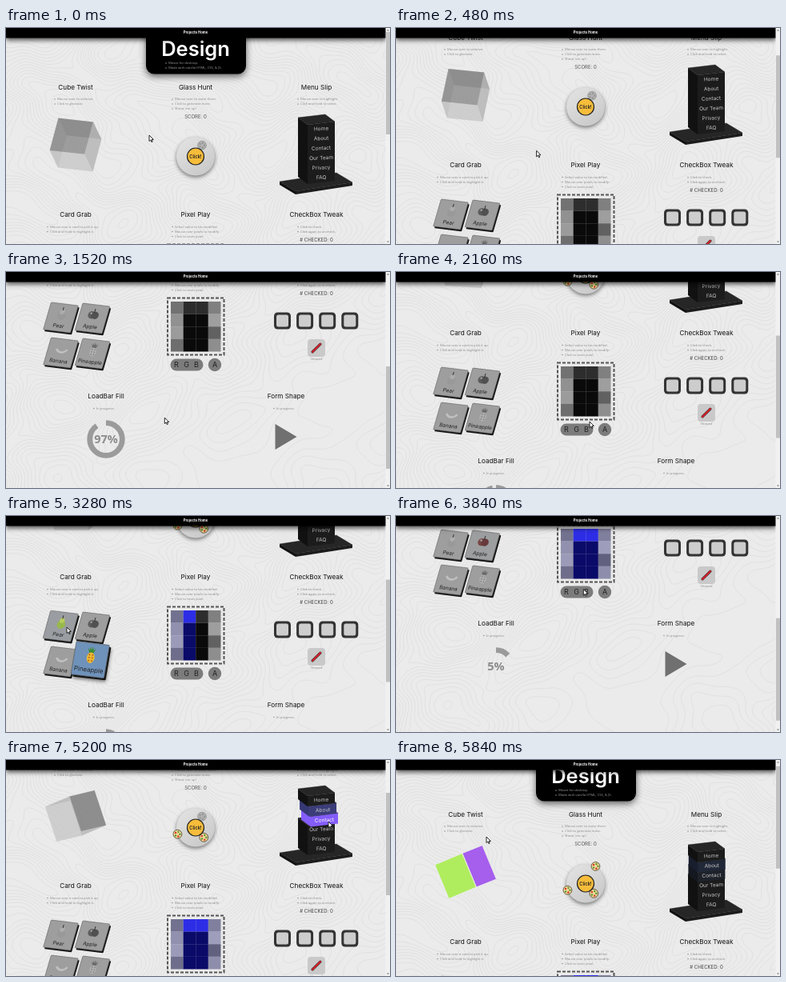
Recreate the animation shown at these times as an HTML page with a canvas. Size 480 px wide and 270 px high, loop 5.92 s.

```html
<!DOCTYPE html>
<html lang="en">
<head>
<meta charset="utf-8">
<title>Design projects</title>
<style>
  html, body { margin: 0; width: 100%; height: 100%; overflow: hidden; background: #ebebeb; }
  canvas { display: block; width: 480px; height: 270px; }
</style>
</head>
<body>
<canvas id="stage" width="480" height="270"></canvas>
<script>
const LOOP = 5920, STEP = 80, PAGE_W = 475, PAGE_H = 544, MAX_SCROLL = 274;
const ctx = document.getElementById('stage').getContext('2d');

const clamp = v => Math.max(0, Math.min(1, v));
const smooth = p => p * p * (3 - 2 * p);
const ramp = (t, from, to) => smooth(clamp((t - from) / (to - from)));
const mix = (a, b, k) => `rgb(${a.map((v, i) => Math.round(v + (b[i] - v) * k))})`;
const gray = v => [v, v, v];
const noise = n => { const v = Math.sin(n * 12.9898 + 4) * 43758.5453; return v - Math.floor(v); };

// Each scroll move: start, end, distance.
const MOVES = [[240, 1020, 274], [1300, 1900, -117], [3320, 3960, 112], [4320, 4800, -193], [5300, 5950, -76]];
const scrollAt = t => MOVES.reduce((y, [from, to, by]) => y + by * ramp(t, from, to), 0);

// Cursor stops: time, x, y.
const STOPS = [[0, 179, 134], [1120, 171, 179], [2160, 242, 187], [2500, 228, 130], [3120, 106, 180],
  [3280, 76, 139], [4320, 370, 51], [5200, 403, 77], [5400, 396, 46], [5700, 113, 96], [LOOP, 113, 96]];

function cursorAt(t) {
  const i = STOPS.findIndex(s => s[0] > t);
  const [from, ax, ay] = STOPS[i - 1], [to, bx, by] = STOPS[i];
  const p = (t - from) / (to - from);
  return [ax + (bx - ax) * p, ay + (by - ay) * p];
}

// Hover strength of a page area: rises fast under the cursor, then fades.
function hover(t, x, y, halfW, halfH) {
  let amount = 0;
  for (let s = Math.max(0, t - 1600); s <= t; s += 40) {
    const [cx, cy] = cursorAt(s);
    const over = Math.abs(cx - x) < halfW && Math.abs(cy + scrollAt(s) - y) < halfH;
    amount = clamp(amount + (over ? .25 : -.06));
  }
  return amount;
}

function text(s, x, y, size, color, { align = 'center', weight = 400, family = 'Inter' } = {}) {
  ctx.font = `${weight} ${size}px "${family}", sans-serif`;
  ctx.textAlign = align;
  ctx.textBaseline = 'middle';
  ctx.fillStyle = color;
  ctx.fillText(s, x, y + .5);
}

function circle(x, y, r, fill, stroke, width = 1) {
  ctx.beginPath();
  ctx.arc(x, y, r, 0, 7);
  ctx.fillStyle = fill;
  ctx.fill();
  if (stroke) { ctx.strokeStyle = stroke; ctx.lineWidth = width; ctx.stroke(); }
}

function poly(points, fill, stroke, width = .5) {
  ctx.beginPath();
  points.forEach(p => ctx.lineTo(p[0], p[1]));
  ctx.closePath();
  ctx.fillStyle = fill;
  ctx.fill();
  if (stroke) { ctx.strokeStyle = stroke; ctx.lineWidth = width; ctx.stroke(); }
}

function box(x, y, w, h, r, fill) {
  ctx.beginPath();
  ctx.roundRect(x, y, w, h, r);
  ctx.fillStyle = fill;
  ctx.fill();
}

function shadowed(blur, dy, color, draw) {
  ctx.save();
  ctx.shadowBlur = blur;
  ctx.shadowOffsetY = dy;
  ctx.shadowColor = color;
  draw();
  ctx.restore();
}

// Topographic lines: marching squares over a sum of waves.
function makeContours() {
  const c = document.createElement('canvas'), cell = 4;
  c.width = PAGE_W; c.height = PAGE_H;
  const g = c.getContext('2d');
  const field = (x, y) => {
    const u = x + 14 * Math.sin(y / 23) + 6 * Math.sin(y / 9 + x / 31);
    const v = y + 13 * Math.sin(x / 27) + 5 * Math.sin(x / 11);
    return 2.2 * Math.sin(u / 31) * Math.cos(v / 27) + 1.6 * Math.sin((u + v) / 43) + 1.2 * Math.cos((u - 1.6 * v) / 37);
  };
  g.strokeStyle = '#dadada';
  g.lineWidth = .6;
  g.beginPath();
  for (let y = 0; y < PAGE_H; y += cell) for (let x = 0; x < PAGE_W; x += cell) {
    const corners = [[x, y], [x + cell, y], [x + cell, y + cell], [x, y + cell]];
    const f = corners.map(p => field(...p));
    for (let level = -4.8; level < 5; level += .48) {
      const hits = [];
      for (let i = 0; i < 4; i++) {
        const j = (i + 1) % 4;
        if (f[i] < level === f[j] < level) continue;
        const k = (level - f[i]) / (f[j] - f[i]);
        hits.push(corners[i].map((v, n) => v + (corners[j][n] - v) * k));
      }
      hits.forEach((p, i) => i % 2 ? g.lineTo(...p) : g.moveTo(...p));
    }
  }
  g.stroke();
  return c;
}
const contours = makeContours();

function bullets(items, x, y, color = '#8a8a8a') {
  items.forEach((s, i) => {
    circle(x, y + i * 6 + .5, .75, color);
    text(s, x + 3, y + i * 6, 4.2, color, { align: 'left', family: 'Open Sans' });
  });
}

function section(title, x, y, indent, ...items) {
  text(title, x, y, 8.2, '#111');
  bullets(items, x - indent, y + 14.5);
}

function drawHeadings() {
  shadowed(8, 3, 'rgba(0,0,0,.6)', () => box(175, -20, 125, 77.5, 10, '#000'));
  text('Design', 237, 27, 25.5, '#fff', { weight: 600 });
  bullets(['Meant for desktop.', 'Made with vanilla HTML, CSS, & JS.'], 200, 43.5, '#999');
  section('Cube Twist', 87, 74, 26, 'Mouse over to colorize.', 'Click to ghostize.');
  section('Glass Hunt', 237, 74, 29, 'Mouse over to scare them.', 'Click to generate more.', "Shoot 'em up!");
  section('Menu Slip', 388, 74, 23, 'Mouse over to highlight.', 'Click and hold to select.');
  section('Card Grab', 87, 233.5, 35, 'Mouse over a card to pick it up.', 'Click and hold to highlight it.');
  section('Pixel Play', 237, 233.5, 29, 'Select value to be modified.', 'Mouse over pixels to modify.', 'Click to reset pixel.');
  section('CheckBox Tweak', 388, 233.5, 23, 'Click to check.', 'Click again to uncheck.');
  section('LoadBar Fill', 125, 393.5, 15, 'In progress.');
  section('Form Shape', 350, 393.5, 15, 'In progress.');
  text('SCORE: 0', 237, 111, 6, '#555');
  text('# CHECKED: 0', 388, 264.5, 6, '#444');
}

function drawCube(t) {
  const p = t / LOOP, color = hover(t, 87, 147, 55, 55);
  const [yaw, pitch, roll] = [75 * p - 110, 25 * Math.cos(p * Math.PI / 2), 15 - 38 * p].map(d => d * Math.PI / 180);
  const turn = (a, b, r) => [a * Math.cos(r) - b * Math.sin(r), a * Math.sin(r) + b * Math.cos(r)];
  const project = ([x, y, z]) => {
    [x, z] = turn(x, z, -yaw);
    [y, z] = turn(y, z, pitch);
    [x, y] = turn(x, y, roll);
    return [87 + x * 23, 146 + y * 23, z];
  };
  const faces = [];
  for (let id = 0; id < 6; id++) {
    const axis = id >> 1, side = id % 2;
    const points = [[-1, -1], [1, -1], [1, 1], [-1, 1]].map(([a, b]) => {
      const v = [];
      v[axis] = 1 - 2 * side; v[(axis + 1) % 3] = a; v[(axis + 2) % 3] = b;
      return project(v);
    });
    const shade = axis ? 190 - 30 * side : 100 + 120 * side;
    faces.push({ points, shade, hue: 270 - 46 * id, z: points.reduce((sum, q) => sum + q[2], 0) });
  }
  faces.sort((a, b) => a.z - b.z).forEach(({ points, shade, hue, z }) => {
    ctx.globalAlpha = .55;
    poly(points, mix(gray(shade), gray(shade), 0));
    ctx.globalAlpha = z > 0 ? color : 0;
    poly(points, `hsl(${hue} 80% 65%)`, '#eee', 1);
  });
  ctx.globalAlpha = 1;
}

function drawBall(x, y, color) {
  circle(x, y, 5.4, mix(gray(178), [240, 215, 150], color), mix(gray(140), [50, 40, 20], color), .7);
  for (let i = 0; i < 5; i++) {
    const tint = i % 2 ? [215, 50, 40] : [80, 150, 50];
    circle(x + 3 * Math.cos(i * 1.26), y + 3 * Math.sin(i * 1.26), 1.2, mix(gray(150), tint, color));
  }
}

function drawGlass(t) {
  const x = 237, y = 160.5;
  const shade = ctx.createLinearGradient(x - 17, y - 23, x + 17, y + 23);
  shade.addColorStop(0, '#e2e2e2');
  shade.addColorStop(1, '#c8c8c8');
  shadowed(5, 2, 'rgba(0,0,0,.5)', () => circle(x, y, 24, shade));
  for (let k = 0; k < 3; k++) {
    const angle = (110 * k - 60) * Math.PI / 180;
    const reach = k ? 8 * (k + 1) * ramp(t, 1200, 2000) : 16 + 9 * ramp(t, 5300, 5800);
    drawBall(x + reach * Math.cos(angle), y + reach * Math.sin(angle), k ? 1 : ramp(t, 5200, 5600));
  }
  circle(x, y, 10.5, '#f6bd3b', '#222', 1.2);
  text('Click!', x, y, 5.6, '#222', { weight: 600 });
}

// Box seen from above: front corner, its two receding edges and its height.
function prism([x, y], [ux, uy], [vx, vy], h, tint) {
  poly([[x + vx, y + vy], [x, y], [x, y + h], [x + vx, y + vy + h]], tint(17));
  poly([[x, y], [x + ux, y + uy], [x + ux, y + uy + h], [x, y + h]], tint(28));
  poly([[x, y], [x + ux, y + uy], [x + ux + vx, y + uy + vy], [x + vx, y + vy]], tint(38), '#161616', .4);
}

function drawMenu(t) {
  prism([362, 204], [71, -11], [-20, -12], 4, v => mix(gray(v), gray(v), 0));
  const names = ['Home', 'About', 'Contact', 'Our Team', 'Privacy', 'FAQ'];
  for (let i = 5; i >= 0; i--) {
    const y = 121 + 12.2 * i, h = hover(t, 394, y + 5, 26, 6.1);
    const glow = [40 + 92 * h, 92, 160 + 90 * h];
    ctx.save();
    ctx.translate(h * 4, h);
    prism([377, y], [34, -4], [-12, -9], 13, v => mix(gray(v), glow, h));
    ctx.translate(394, y + 4.5);
    ctx.rotate(-.05);
    text(names[i], 0, 0, 6.5, h > .8 ? '#fff' : '#c4c4c4');
    ctx.restore();
  }
}

const FRUITS = {
  Pear(tint) {
    circle(0, 2, 5, tint([150, 195, 50]));
    circle(0, -3, 3, tint([190, 215, 70]));
    box(-.5, -9, 1, 4, 0, '#333');
  },
  Apple(tint) {
    circle(-2, 0, 4.6, tint([150, 45, 40]));
    circle(2, 0, 4.6, tint([130, 30, 35]));
    circle(-3, -2, 1.2, '#aaa');
    box(0, -8, 1, 5, 0, '#333');
  },
  Banana(tint) {
    ctx.beginPath();
    ctx.arc(0, -4, 7.5, .45, 2.6);
    ctx.strokeStyle = tint([250, 220, 80]);
    ctx.lineWidth = 2.5;
    ctx.stroke();
  },
  Pineapple(tint) {
    for (let i = -2; i <= 2; i++) poly([[-1.5, -2], [i * 2.2, -10 + Math.abs(i)], [1.5, -2]], tint([60, 140, 50]));
    ctx.beginPath();
    ctx.ellipse(0, 2, 4, 5.5, 0, 0, 7);
    ctx.fillStyle = tint([235, 185, 50]);
    ctx.fill();
    for (let i = 0; i < 6; i++) circle(-1.6 + i % 2 * 3.2, -1 + (i >> 1) * 3, .7, tint([175, 80, 30]));
  }
};

function drawCard(t, name, i) {
  const x = 68.5 + 39.5 * (i % 2), y = 295 + i % 2 + 44 * (i >> 1);
  const glow = hover(t, x, y, 15, 15), lift = glow * glow;
  const luma = c => 30 + .3 * c[0] + .4 * c[1];
  ctx.save();
  ctx.translate(x - lift * 4, y - lift * 5);
  ctx.transform(1, .12, -.29 + .18 * lift, 1, 0, 0);
  ctx.scale(1 + .32 * lift, 1 + .32 * lift);
  shadowed(lift * 7, lift * 3, 'rgba(0,0,0,.5)', () => box(-15, -15, 34, 34, 1, '#151515'));
  box(-17, -17, 34, 34, 1, mix(gray(158), [88, 140, 200], lift));
  ctx.strokeStyle = '#555';
  ctx.lineWidth = .5;
  ctx.stroke();
  ctx.translate(0, -4);
  FRUITS[name](c => mix(gray(luma(c)), c, clamp(glow * 3)));
  text(name, 0, 14, 6.4, '#222');
  ctx.restore();
}

function drawPixels(t) {
  ctx.strokeStyle = '#555';
  ctx.lineWidth = 2;
  ctx.setLineDash([4, 2]);
  ctx.strokeRect(202, 270.5, 70.5, 71);
  ctx.setLineDash([]);
  for (let row = 0; row < 4; row++) for (let col = 0; col < 4; col++) {
    const inner = col === 1 || col === 2;
    const base = inner ? (row ? 10 : 45) : 80 + 80 * noise(row * 4 + col);
    const painted = t >= (col < 2 ? 2500 : 3600) + row * 60;
    const blue = base + (painted ? (inner ? (row ? 95 : 185) : 30) : 0);
    ctx.fillStyle = mix([base, base, blue], gray(0), 0);
    ctx.fillRect(206 + col * 15.6, 275 + row * 15.6, 15.7, 15.7);
  }
  box(205.5, 346.5, 41, 15, 7.5, '#7c7c7c');
  circle(261, 354, 8.2, '#7c7c7c');
  [...'RGB'].forEach((s, i) => text(s, 213 + 12.5 * i, 354, 9, '#222'));
  text('A', 261, 354, 9, '#222');
}

function drawChecks() {
  for (let i = 0; i < 4; i++) {
    box(335 + i * 28.1, 288.5, 21, 21, 4.5, '#333');
    box(338 + i * 28.1, 291.5, 15, 15, 2.5, '#cdcdcd');
  }
  box(377, 322, 22, 22, 4, '#c9c9c9');
  ctx.save();
  ctx.translate(388, 333);
  ctx.rotate(-Math.PI / 4);
  box(-8.5, -1.6, 17, 3.2, 1.5, '#333');
  box(-8, -1.1, 16, 2.2, 1, '#d3202a');
  ctx.restore();
  text('Showed', 388, 346.5, 4, '#888', { family: 'Open Sans' });
}

function drawLoader(t) {
  const p = (.757 + t / 10300) % 1;
  ctx.beginPath();
  ctx.arc(125, 447, 20.3, -Math.PI / 2, (2 * p - .5) * Math.PI);
  ctx.strokeStyle = '#9b9b9b';
  ctx.lineWidth = 6.8;
  ctx.stroke();
  text(Math.round(smooth(p) * 100) + '%', 125, 447, 14.5, '#8c8c8c', { weight: 600, family: 'Noto Sans' });
  poly([[336.5, 428], [336.5, 460], [363.5, 444]], '#707070');
}

function drawChrome(scroll) {
  shadowed(6, 2, 'rgba(0,0,0,.7)', () => box(0, -10, PAGE_W, 22.5, 0, '#000'));
  text('Projects Home', 237, 5.5, 4.3, '#fff', { weight: 700 });
  box(474.5, 0, 5.5, 270, 0, '#f1f1f1');
  box(475, 5 + scroll * 130 / MAX_SCROLL, 5, 128, 0, '#c1c1c1');
  poly([[476, 3.5], [479, 3.5], [477.5, 1.8]], '#777');
  poly([[476, 266.5], [479, 266.5], [477.5, 268.2]], '#777');
}

function drawCursor([x, y]) {
  const shape = [[0, 0], [0, 7.5], [1.8, 6], [3, 8.6], [4.2, 8], [3, 5.5], [5.4, 5.4]];
  poly(shape.map(([dx, dy]) => [x + dx, y + dy]), '#fff', '#111', .9);
}

function draw(t) {
  const scroll = scrollAt(t);
  box(0, 0, 480, 270, 0, '#ebebeb');
  ctx.save();
  ctx.translate(0, -Math.round(scroll));
  ctx.drawImage(contours, 0, 0);
  drawHeadings();
  drawCube(t);
  drawGlass(t);
  drawMenu(t);
  Object.keys(FRUITS).forEach((name, i) => drawCard(t, name, i));
  drawPixels(t);
  drawChecks();
  drawLoader(t);
  ctx.restore();
  drawChrome(scroll);
  drawCursor(cursorAt(t));
}

function tick() {
  const t = performance.now() % LOOP;
  draw(Math.floor(t / STEP) * STEP);
  requestAnimationFrame(tick);
}
tick();
</script>
</body>
</html>
```
